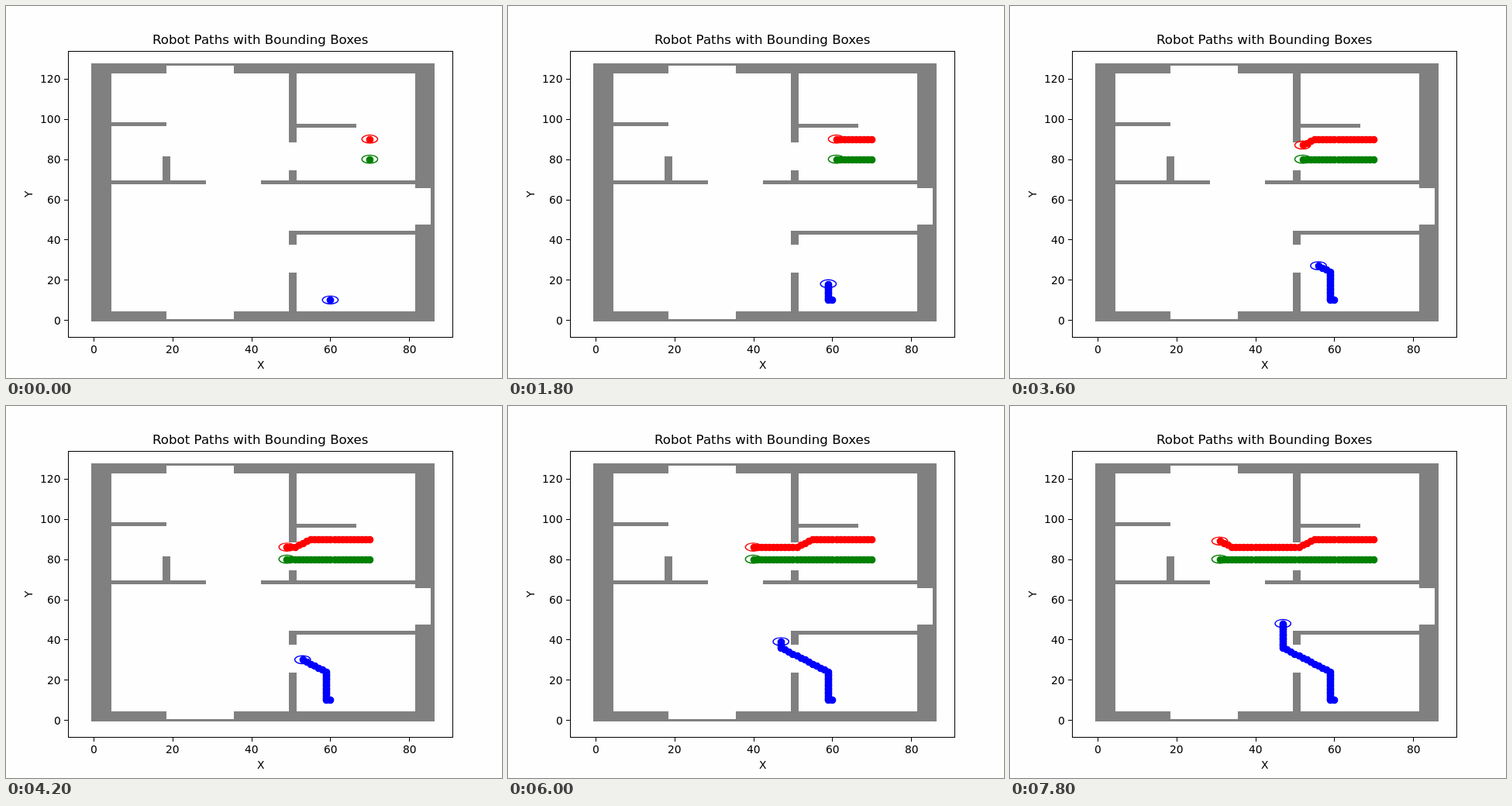
An HTML page with a canvas for the animation above (8 s loop, 640x480 px).

```html
<!DOCTYPE html>
<html lang="en">
<head>
<meta charset="utf-8">
<title>Robot Paths</title>
<style>
  html, body { margin: 0; width: 100%; height: 100%; overflow: hidden; background: #fefefe; }
  canvas { display: block; }
</style>
</head>
<body>
<canvas id="stage" width="640" height="480"></canvas>
<script>
const ctx = document.getElementById('stage').getContext('2d');
const STEP = 200, STEPS = 40;
const PT = 100 / 72;
const PAPER = '#fefefe', WALL = '#808080';

// Plot area in pixels and the data range it covers
const box = { left: 80, right: 576, top: 57.6, bottom: 427.2 };
const range = { x0: -6.425, x1: 90.925, y0: -8.475, y1: 133.975 };
const sx = (box.right - box.left) / (range.x1 - range.x0);
const sy = (box.bottom - box.top) / (range.y1 - range.y0);
const px = x => box.left + (x - range.x0) * sx;
const py = y => box.bottom - (y - range.y0) * sy;

const house = { w: 87, h: 128, wall: 5, thin: 2 };

const clamp = (v, lo, hi) => Math.min(hi, Math.max(lo, v));

const robots = [
  { color: '#ff0000', at: n => [70 - n, 90 - clamp(n - 15, 0, 4) + Math.max(0, n - 36)] },
  { color: '#008000', at: n => [70 - n, 80] },
  { color: '#0000ff', at: n => n ? [59 - clamp(n - 15, 0, 12), 9 + n] : [60, 10] }
];

// Fills w by h cells, starting at the lower left cell
function cells(x, y, w, h, color = WALL) {
  const left = Math.round(px(x - 0.5)), right = Math.round(px(x + w - 0.5));
  const top = Math.round(py(y + h - 0.5)), bottom = Math.round(py(y - 0.5));
  ctx.fillStyle = color;
  ctx.fillRect(left, top, right - left, bottom - top);
}

const gap = (x, y, w, h) => cells(x, y, w, h, PAPER);
const across = (x, y, w) => cells(x, y, w, house.thin);
const upright = (x, y, h) => cells(x, y, house.thin, h);

function drawHouse() {
  const { w, h, wall, thin } = house;
  const inner = w - 2 * wall;
  cells(0, 0, w, h);
  gap(wall, wall, inner, h - 2 * wall);

  // Window niches leave one cell of outer wall
  gap(19, 1, 17, h - 2);
  gap(w - wall, 48, wall - 1, 18);

  // Main partitions, then their doors and the hall
  upright(50, wall, h - 2 * wall);
  gap(50, 24, thin, 14);
  gap(50, 45, thin, 23);
  gap(50, 75, thin, 14);
  across(wall, 68, inner);
  gap(29, 68, 14, thin);

  across(50, 43, 32);
  across(52, 96, 15);
  across(wall, 97, 14);
  upright(18, 68, 14);
}

function drawRobot({ color, at }, step) {
  ctx.fillStyle = ctx.strokeStyle = color;
  const [x, y] = at(step);
  ctx.lineWidth = PT;
  ctx.beginPath();
  ctx.ellipse(px(x), py(y), 2 * sx, 2 * sy, 0, 0, 2 * Math.PI);
  ctx.stroke();
  for (let n = 0; n <= step; n++) {
    const [dx, dy] = at(n);
    ctx.beginPath();
    ctx.arc(Math.round(px(dx)) + 0.5, Math.round(py(dy)) + 0.5, 3.5 * PT, 0, 2 * Math.PI);
    ctx.fill();
  }
}

function line(x1, y1, x2, y2) {
  ctx.beginPath();
  ctx.moveTo(x1, y1);
  ctx.lineTo(x2, y2);
  ctx.stroke();
}

// align: 0.5 centres the text on x, 1 ends it there; side bearings are left out
function label(text, x, y, size, align) {
  ctx.font = `${size * PT}px "DejaVu Sans", sans-serif`;
  const width = ctx.measureText(text).width - 0.7;
  ctx.fillText(text, Math.round(x - width * align), Math.round(y));
}

function drawAxes() {
  const midX = (box.left + box.right) / 2, midY = (box.top + box.bottom) / 2;
  ctx.fillStyle = ctx.strokeStyle = '#000';
  ctx.lineWidth = 1;
  ctx.strokeRect(80.5, 58.5, 496, 369);
  for (let v = 0; v <= 80; v += 20) {
    const x = Math.round(px(v)) + 0.5;
    line(x, 428, x, 433);
    label(String(v), px(v), 448, 10, 0.5);
  }
  for (let v = 0; v <= 120; v += 20) {
    const y = Math.round(py(v)) + 0.5;
    line(75, y, 80, y);
    label(String(v), box.left - 7 * PT, py(v) + 5.5, 10, 1);
  }
  label('Robot Paths with Bounding Boxes', midX, 49, 12, 0.5);
  label('X', midX, 468, 10, 0.5);
  ctx.save();
  ctx.translate(34, Math.ceil(midY));
  ctx.rotate(-Math.PI / 2);
  label('Y', 0, 0, 10, 0.5);
  ctx.restore();
}

function draw(step) {
  ctx.fillStyle = PAPER;
  ctx.fillRect(0, 0, 640, 480);
  drawHouse();
  for (const robot of robots) drawRobot(robot, step);
  drawAxes();
}

const start = performance.now();
function tick() {
  draw(Math.floor((performance.now() - start) / STEP) % STEPS);
  requestAnimationFrame(tick);
}
tick();
</script>
</body>
</html>
```
